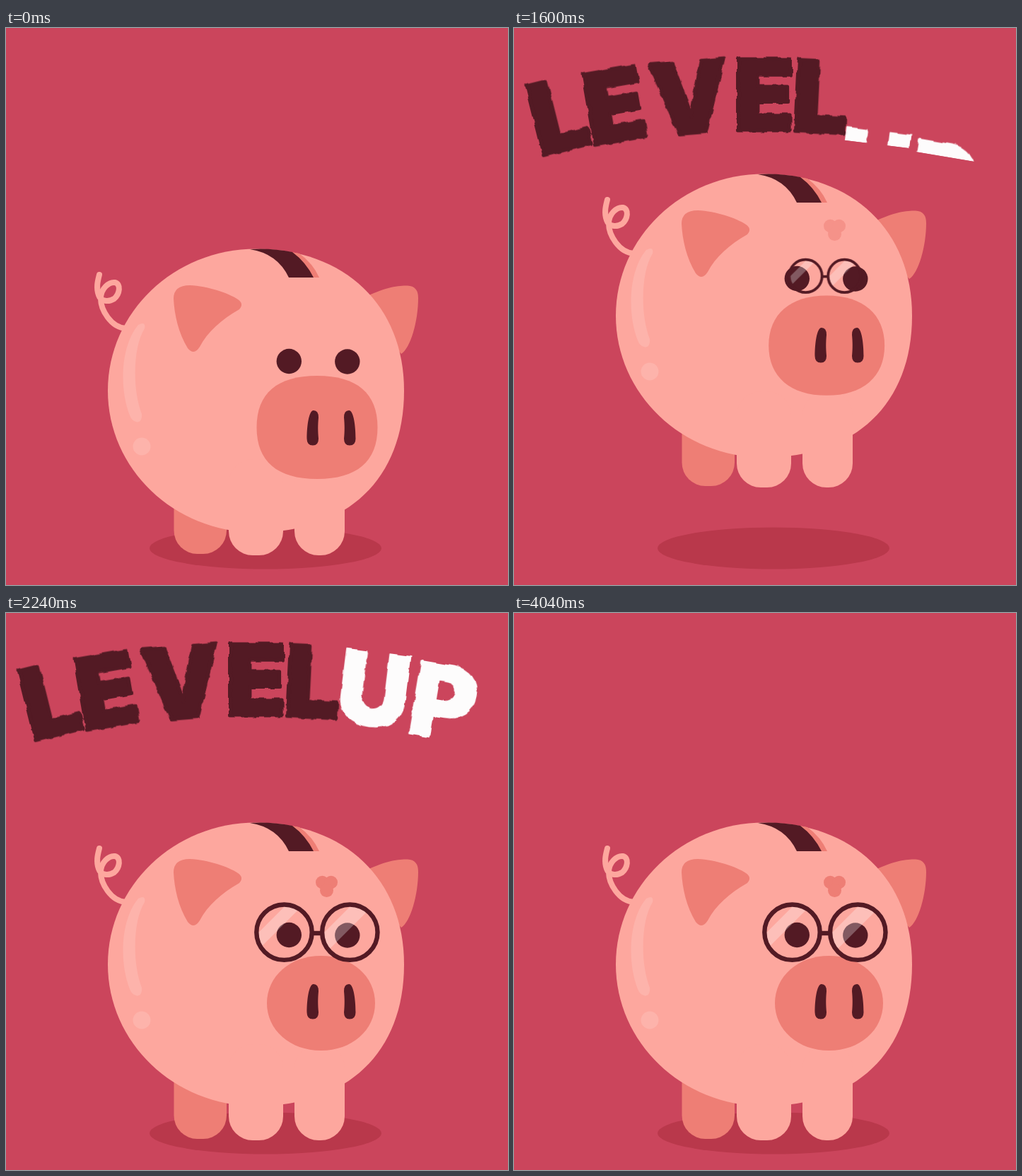
These frames come from a looping animation (710 by 788 pixels, 9 s). An HTML page:

```html
<!DOCTYPE html>
<html lang="en">
<head>
<meta charset="utf-8">
<title>Level up</title>
<style>
:root {
  --bg: #cb455c;
  --shade: #b9384b;
  --skin: #fda79e;
  --coral: #ee7e75;
  --dark: #531a24;
  --sine: cubic-bezier(.37, 0, .63, 1);
  --cubic: cubic-bezier(.65, 0, .35, 1);
}
html, body { margin: 0; width: 100%; height: 100%; overflow: hidden; background: var(--bg); }
svg { display: block; width: 100vw; height: 100vh; }
.skin { fill: var(--skin); }
.coral { fill: var(--coral); }
.dark { fill: var(--dark); }
.glow { fill: #fdb3ab; }

.body, .legs, .face, .snout, .mark, .glasses, text {
  animation: 9s var(--sine) infinite both;
}
.body { animation-name: body; }
.legs { animation-name: legs; }
.face { animation-name: face; }
.snout { animation-name: snout; }
.mark { animation-name: mark; }
.glasses { animation-name: glasses; transform-origin: 440px 468px; }

text {
  font: 900 139px Inter, "Open Sans", sans-serif;
  stroke-linejoin: round;
  filter: url(#rough);
  animation-timing-function: var(--cubic);
}
.level { fill: var(--dark); stroke: var(--dark); stroke-width: 5; animation-name: level; }
.up { fill: #fdfcfc; stroke: #fdfcfc; stroke-width: 2; font-size: 143px; animation-name: up; }

/* crouch, jump, land on longer legs */
@keyframes body {
  0%, 10.222% { transform: translateY(0); }
  12.444%, 14.222% { transform: translateY(21px); }
  17.778% { transform: translateY(-106px); }
  24.667%, 100% { transform: translateY(-16px); }
}
@keyframes legs {
  0%, 15.111% { transform: translateY(0); }
  17.778% { transform: translateY(-96px); }
  24.667%, 100% { transform: translateY(0); }
}
@keyframes face {
  0%, 10.222% { transform: translateY(0); }
  12.444%, 14.222% { transform: translateY(11px); }
  17.778%, 20.444% { transform: translateY(-11px); }
  24.667%, 100% { transform: translateY(0); }
}
@keyframes snout {
  0%, 16.444% { d: path("M354.5 565C354.5 516.8 383.6 492 440 492S525.5 516.8 525.5 565 496.4 638 440 638 354.5 613.2 354.5 565Z"); }
  19.556%, 100% { d: path("M369 568C369 529.8 401.9 501 445.5 501S522 529.8 522 568 489.1 635 445.5 635 369 606.2 369 568Z"); }
}
@keyframes mark {
  0%, 16% { opacity: 0; }
  19.556%, 100% { opacity: 1; }
}
@keyframes glasses {
  0%, 16% { transform: scale(0); }
  19.2%, 100% { transform: scale(1); }
}
@keyframes level {
  0%, 14.111% { transform: translateY(120px); }
  17.222%, 36.889% { transform: translateY(0); }
  40%, 100% { transform: translateY(120px); }
}
@keyframes up {
  0%, 16.556% { transform: translateY(120px); }
  19.667%, 41.778% { transform: translateY(0); }
  44.889%, 100% { transform: translateY(120px); }
}
</style>
</head>
<body>
<svg viewBox="0 0 710 788">
  <defs>
    <filter id="rough" x="-15%" y="-15%" width="130%" height="130%" color-interpolation-filters="sRGB">
      <feTurbulence type="fractalNoise" baseFrequency=".09" numOctaves="1" seed="4"/>
      <feDisplacementMap in="SourceGraphic" scale="6" xChannelSelector="R" yChannelSelector="G"/>
    </filter>
    <clipPath id="line"><rect x="-80" y="-150" width="260" height="155"/></clipPath>
    <clipPath id="lens"><circle r="37"/></clipPath>
    <path id="nostril" d="M434 541Q441 541 441 551C440 562 440 570 441 581Q441 590.5 433 590.5 424.5 590.5 424.5 581C424.5 565 427 541 434 541Z"/>
  </defs>

  <rect width="710" height="788" fill="var(--bg)"/>
  <ellipse cx="367" cy="736" rx="164" ry="29.5" fill="var(--shade)"/>

  <g class="body">
    <path d="M170 425C148 424 134 398 134 383 134 368 146 359 154 360 163 362 161 376 153 383 145 388 134 387 131 378 127 367 130 357 132 349"
      fill="none" stroke="var(--skin)" stroke-width="8" stroke-linecap="round"/>
    <path class="coral" d="M505 382C535 367 555 364 568 364.5Q583 365 583 382C583 415 572 453 559 461L530 430Z"/>
  </g>
  <g class="legs">
    <rect class="coral" x="237.5" y="610" width="74.5" height="134" rx="33"/>
  </g>
  <g class="body">
    <path class="skin" d="M144 513C144 402.3 237.8 312.5 353.5 312.5 479.2 312.5 563 392.7 563 513 563 637.3 483.4 713.5 353.5 713.5 237.8 713.5 144 623.7 144 513Z"/>
  </g>
  <g class="legs skin">
    <rect x="315" y="610" width="77" height="136" rx="34"/>
    <rect x="408" y="610" width="71" height="136" rx="34"/>
  </g>

  <g class="body">
    <path class="coral" d="M404 317L415 319Q434 333 443 353H432Z"/>
    <path class="dark" d="M345 313Q375 311 405 317 424 331 435 353H400Q384 319 345 313Z"/>
    <path class="coral" d="M237 383Q237 364 260 364C285 365 315 375 328 384Q337 390 330 398C305 412 285 430 274 451Q266 464 257 453C244 432 238 405 237 383Z"/>
    <path class="glow" d="M187 420Q198 414 196 425C180 450 178 510 192 546 193 555 188 559 184 557Q178 556 175 548C160 510 162 450 187 420Z"/>
    <circle class="glow" cx="192" cy="592" r="12.5"/>

    <g class="face">
      <path class="snout coral" d="M354.5 565C354.5 516.8 383.6 492 440 492S525.5 516.8 525.5 565 496.4 638 440 638 354.5 613.2 354.5 565Z"/>
      <g class="dark">
        <use href="#nostril" x="1"/>
        <use href="#nostril" transform="translate(919) scale(-1 1)"/>
        <circle cx="400.3" cy="471.5" r="17.7"/>
        <circle cx="482.8" cy="472" r="17.7"/>
      </g>
      <g class="mark coral">
        <circle cx="447.3" cy="397" r="9.3"/>
        <circle cx="459.7" cy="397" r="9.3"/>
        <circle cx="453.5" cy="408.5" r="9.5"/>
      </g>
      <g class="glasses" fill="none" stroke="var(--dark)" stroke-width="6.4">
        <g transform="translate(393.5 467.7)">
          <path d="M-76 40L4-40H28L-52 40Z" fill="#fff" stroke="none" opacity=".28" clip-path="url(#lens)"/>
          <circle r="39.2"/>
        </g>
        <g transform="translate(486.3 467.7)">
          <path d="M-76 40L4-40H35L-45 40Z" fill="#fff" stroke="none" opacity=".28" clip-path="url(#lens)"/>
          <circle r="39.2"/>
        </g>
        <path d="M433 469H447"/>
      </g>
    </g>
  </g>

  <g clip-path="url(#line)" transform="translate(36.5 181.5) rotate(-14)"><text class="level">L</text></g>
  <g clip-path="url(#line)" transform="translate(109 166.5) rotate(-9.8)"><text class="level">E</text></g>
  <g clip-path="url(#line)" transform="translate(252 148.5) rotate(-4.5)"><text class="level" text-anchor="middle">V</text></g>
  <g clip-path="url(#line)" transform="translate(311 144.5)"><text class="level">E</text></g>
  <g clip-path="url(#line)" transform="translate(392 145.5) rotate(2.8)"><text class="level">L</text></g>
  <g clip-path="url(#line)" transform="translate(514 159.5) rotate(7)"><text class="up" text-anchor="middle">U</text></g>
  <g clip-path="url(#line)" transform="translate(564.5 169.5) rotate(9.5)"><text class="up">P</text></g>
</svg>
</body>
</html>
```
